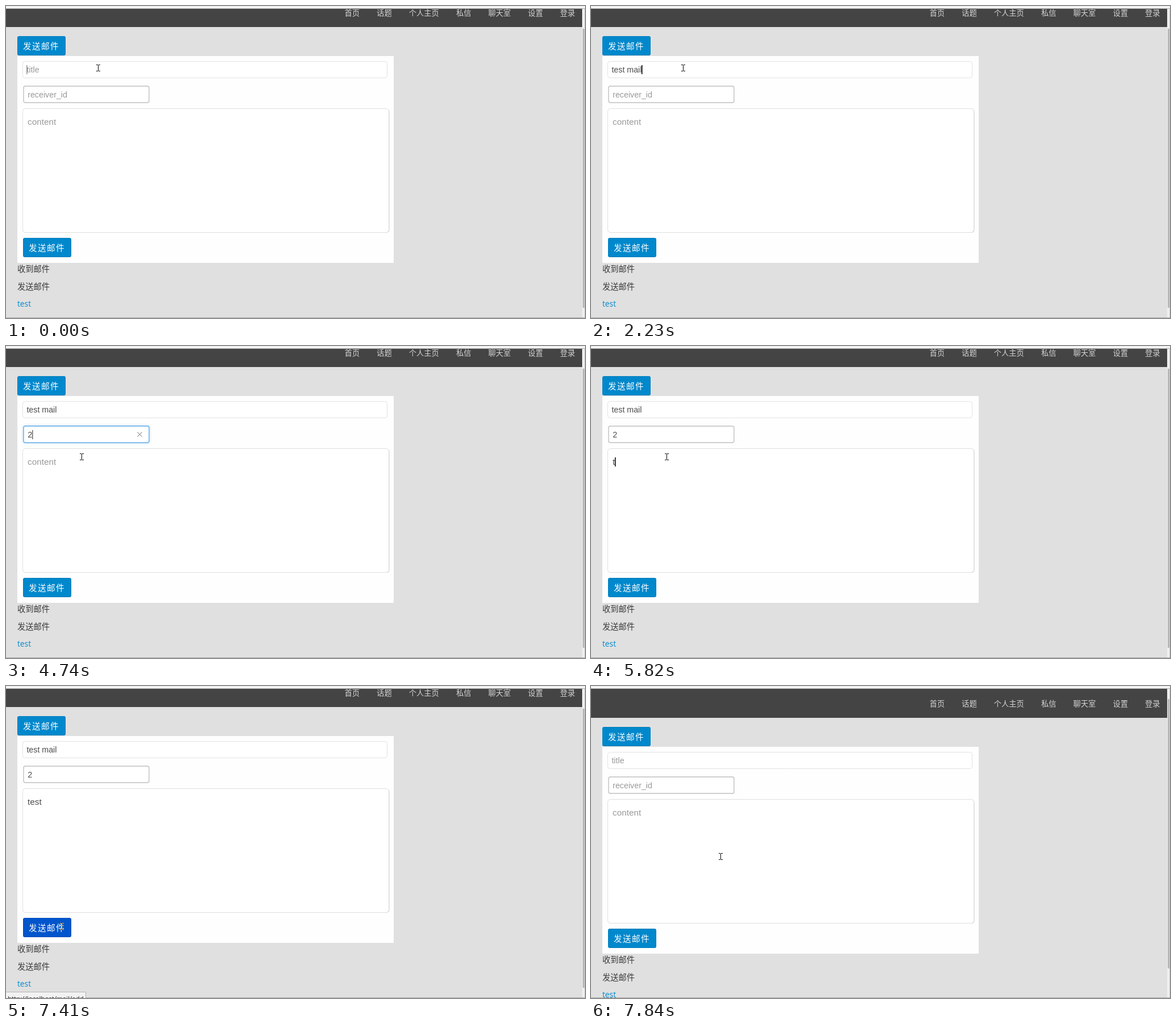
An HTML page with a canvas for the animation above (8 s loop, 1020 by 549 pixels).

```html
<!DOCTYPE html>
<html lang="zh">
<head>
<meta charset="utf-8">
<title>发送邮件</title>
<style>
html, body { margin: 0; width: 100%; height: 100%; overflow: hidden; background: #e0e0e0; }
canvas { display: block; }
</style>
</head>
<body>
<canvas id="stage" width="1020" height="549"></canvas>
<script>
const ctx = document.getElementById('stage').getContext('2d');
const LOOP = 8000;
const RELOAD = 7490;
const SCROLL = 19;
const SANS = '"Liberation Sans", Arial, sans-serif';
const CJK = '"Noto Sans CJK SC", "Noto Sans CJK", sans-serif';
const LATIN = '"Open Sans", sans-serif';
const BLUE = '#0088cc';

const NAV = ['首页', '话题', '个人主页', '私信', '聊天室', '设置', '登录'];

// Each field: when it has focus, and its text typed at an even pace.
const title = { focus: 70, blur: 3180, text: 'test mail', start: 660, pace: 196,
  hint: 'title', x: 36.4, base: 117, size: 14.25 };
const receiver = { focus: 3180, blur: 4910, text: '2', start: 4320, pace: 100,
  hint: 'receiver_id', x: 38.2, base: 160.5, size: 14.25 };
const content = { focus: 4910, blur: 7330, text: 'test', start: 5820, pace: 113,
  hint: 'content', x: 38, base: 209, size: 15.3 };

const ramp = (t, from, to) => Math.min(1, Math.max(0, (t - from) / (to - from)));
const ease = k => k * k * (3 - 2 * k);

function typedCount(field, t) {
  if (t >= RELOAD || t < field.start) return 0;
  return Math.min(field.text.length, 1 + Math.floor((t - field.start) / field.pace));
}

// The caret blinks once a second, starting afresh with each key.
function caretAlpha(field, t, count) {
  const shown = t < field.blur && (t >= field.focus || field === title);
  if (!shown) return 0;
  const since = count ? field.start + (count - 1) * field.pace : field.focus;
  const phase = (t - since + 1000) % 1000;
  return 1 - ramp(phase, 380, 480) + ramp(phase, 890, 990);
}

function mousePos(t) {
  const down = ease(ramp(t, 4400, 4740));
  const toButton = ease(ramp(t, 6680, 7160));
  const away = ease(ramp(t, 7650, 7840));
  return [162 - 29 * down - 35 * toButton + 130 * away,
    109 + 86 * down + 228 * toButton - 123 * away].map(Math.round);
}

function rect(x, y, w, h, fill) {
  ctx.fillStyle = fill;
  ctx.fillRect(x, y, w, h);
}

function roundBox(x, y, w, h, r, fill, stroke, line = 1) {
  ctx.beginPath();
  ctx.roundRect(x, y, w, h, r);
  if (fill) { ctx.fillStyle = fill; ctx.fill(); }
  if (stroke) { ctx.strokeStyle = stroke; ctx.lineWidth = line; ctx.stroke(); }
}

function text(str, x, y, size, family, color, spacing = 0) {
  ctx.font = size + 'px ' + family;
  ctx.letterSpacing = spacing + 'px';
  ctx.fillStyle = color;
  ctx.fillText(str, x, y);
  const width = ctx.measureText(str).width;
  ctx.letterSpacing = '0px';
  return width;
}

function button(x, y, color) {
  roundBox(x, y, 85, 34, 3, color);
  roundBox(x + 0.5, y + 0.5, 84, 33, 3, null, 'rgba(0,0,0,0.08)');
  text('发送邮件', x + 10, y + 22.5, 14.6, CJK, '#fff', 1.4);
}

function fieldText(field, t) {
  const { x, base, size, hint } = field;
  const count = typedCount(field, t);
  const width = count ? text(field.text.slice(0, count), x, base, size, SANS, '#4c4c4c') : 0;
  if (!count) text(hint, x, base, size, SANS, '#999');
  const alpha = caretAlpha(field, t, count);
  if (alpha) rect(Math.round(x + width), Math.round(base) - 13, 1.5, 16, `rgba(0,0,0,${alpha})`);
}

function clearCross(x, y) {
  ctx.strokeStyle = '#666';
  ctx.lineWidth = 1;
  ctx.beginPath();
  ctx.moveTo(x - 4, y - 4); ctx.lineTo(x + 4, y + 4);
  ctx.moveTo(x + 4, y - 4); ctx.lineTo(x - 4, y + 4);
  ctx.stroke();
}

function receiverBox(glow) {
  roundBox(31, 141, 221, 29, 3, '#fff', '#c0c0c0', 1.4);
  if (!glow) return;
  ctx.save();
  ctx.globalAlpha = glow;
  ctx.shadowColor = 'rgba(82,168,236,0.6)';
  ctx.shadowBlur = 5;
  roundBox(31, 141, 221, 29, 3, '#fff');
  ctx.shadowColor = 'transparent';
  roundBox(31, 141, 221, 29, 3, null, '#6cb5ef', 1.4);
  ctx.restore();
}

function form(t) {
  rect(20, 88, 663, 364, '#fefefe');
  roundBox(29.5, 97.5, 642, 29, 4, '#fff', '#e2e2e2');
  fieldText(title, t);

  receiverBox(ramp(t, 3100, 3360) - ramp(t, 4850, 5080));
  fieldText(receiver, t);
  if (t >= receiver.start && t < receiver.blur) clearCross(235.5, 155.5);

  roundBox(30, 181, 645.5, 218, 5, '#d2d2d2');
  roundBox(29.5, 180.5, 645, 218, 5, '#fff', '#dedede');
  fieldText(content, t);

  const hover = t < RELOAD ? ramp(t, 7000, 7160) : 0;
  button(30, 408, `rgb(0,${136 - 51 * hover},204)`);
}

function nav() {
  const size = 13.3;
  let x = 596.5;
  for (const label of NAV) {
    text(label, x, 16.8, size, CJK, '#d4d4d4');
    x += label.length * size + 30;
  }
}

function page(t) {
  rect(0, -SCROLL, 1020, 37 + SCROLL, '#444');
  nav();
  button(20, 53, BLUE);
  form(t);
  text('收到邮件', 20, 468, 14.25, CJK, '#3a3a3a');
  text('发送邮件', 20, 498.5, 14.25, CJK, '#3a3a3a');
  text('test', 20, 529, 13.8, LATIN, BLUE);
}

function chrome(t) {
  const top = t < RELOAD ? 40 : 23;
  const height = t < RELOAD ? 491 : 474;
  rect(1015, 5, 5, 544, '#efefef');
  rect(1016, top, 3, height, '#b8b8b8');
  rect(1019, 5, 1, 544, '#cfcfcf');
  rect(0, 0, 1020, 4, '#f2f2f2');
  rect(0, 4, 1020, 1, '#b0b0b0');
  rect(0, 548, 1020, 1, '#a8a8a8');
}

function statusBar(alpha) {
  ctx.save();
  ctx.globalAlpha = alpha;
  rect(0, 538, 141, 11, '#b4b4b4');
  rect(0, 539, 140, 10, '#f2f2f2');
  text('http://localhost/mail/add', 3, 554, 11.5, LATIN, '#222');
  ctx.restore();
}

// The I-beam inverts whatever lies beneath it.
function mouse([x, y]) {
  ctx.save();
  ctx.globalCompositeOperation = 'difference';
  for (const serif of [y - 6, y + 5]) {
    rect(x - 3, serif, 3, 1, '#fff');
    rect(x + 1, serif, 3, 1, '#fff');
  }
  rect(x, y - 5, 1, 10, '#fff');
  ctx.restore();
}

function draw(t) {
  rect(0, 0, 1020, 549, '#e0e0e0');
  ctx.save();
  if (t >= RELOAD) ctx.translate(0, SCROLL);
  page(t);
  ctx.restore();
  chrome(t);
  if (t < 7730) statusBar(ramp(t, 7250, 7410));
  mouse(mousePos(t));
}

const begin = performance.now();
function tick() {
  draw((performance.now() - begin) % LOOP);
  requestAnimationFrame(tick);
}
tick();
</script>
</body>
</html>
```
